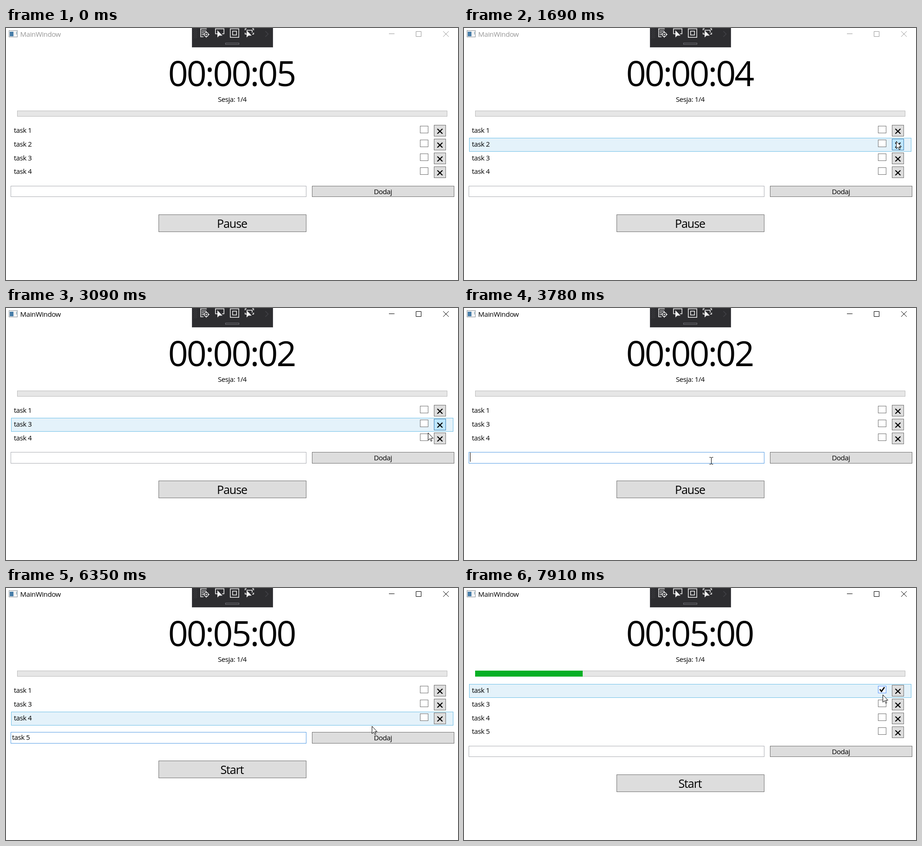
An HTML page that plays this animation: 975x546 px, repeating every 7.99 s.

```html
<!DOCTYPE html>
<html lang="pl">
<head>
<meta charset="utf-8">
<title>Task timer</title>
<style>
  html, body { margin: 0; width: 100%; height: 100%; overflow: hidden; background: #fff; }
  svg { display: block; width: 975px; height: 546px; }
  text { font: 15px "Open Sans", "Noto Sans", sans-serif; letter-spacing: -.03em; white-space: pre; }
  .mid { text-anchor: middle; }
  #timer { font-size: 75px; letter-spacing: -.039em; }
  #action { font-size: 25px; letter-spacing: -.042em; }
  .line { fill: none; stroke: #000; }
  .frame { color: #000; }
  .frame.idle { color: #999; }
  .frame text { fill: currentColor; letter-spacing: -.025em; }
  .frame .line { stroke: currentColor; }
  .btn { fill: #ddd; stroke: #707070; }
  .btn.hot { fill: #bee6fd; stroke: #3c7fb1; }
  .btn.down { fill: #c4e5f6; stroke: #2c628b; }
  .box { fill: #fff; stroke: #707070; }
  .box.hot { fill: #f3f9ff; stroke: #5593ff; }
  .row { fill: none; }
  .row.hot { fill: #e4f2fa; stroke: #70c0e7; }
  #field { fill: #fff; stroke: #abadb3; }
  #field.hot { stroke: #7eb4ea; }
  #field.focus { stroke: #569de5; }
  .tools { fill: none; stroke: #f1f1f1; stroke-width: 1.5; }
  .tools .solid { fill: #f1f1f1; stroke: none; }
  .tools .dim { stroke: #57575c; stroke-width: 1; }
</style>
</head>
<body>
<svg viewBox="0 0 975 546">
  <g>
    <rect x="6.5" y="5.5" width="18" height="14" fill="#f7f7f7" stroke="#8b9299"/>
    <rect x="8" y="8" width="8" height="10" fill="#477ca8"/>
    <path d="M17.5 8V18" stroke="#d5dbe0"/>
    <path d="M22.5 8V14" stroke="#5f91a9"/>
  </g>
  <g id="frame" class="frame">
    <text x="30.5" y="19">MainWindow</text>
    <path class="line" d="M826 12.5H838M884.5 7.5H895.5V18.5H884.5Z"/>
    <path class="line" d="M943 7L955 19M955 7L943 19"/>
  </g>

  <g class="tools">
    <rect x="401.5" y="-1" width="174" height="42.5" fill="#2d2d30" stroke="#46464b" stroke-width="1"/>
    <path class="dim" d="M405.5 1V22M409.5 1V22" stroke-dasharray="1 3"/>
    <path class="dim" d="M407.5 3V22M411.5 3V22" stroke-dasharray="1 3"/>
    <path d="M419 2H433M420 1V19H426M422 6.5H432M422 10.5H427M422 14.5H425"/>
    <circle cx="432" cy="14" r="4.5"/>
    <circle class="solid" cx="432" cy="14" r="1.6"/>
    <path d="M432 7V11M432 17V21M425 14H429M435 14H439"/>
    <path d="M456 12.5H451.8V1.8H470.2V12.5H466"/>
    <path class="solid" d="M456 5V20.5L460 16.5H467Z"/>
    <path d="M483.8 1.8H502.2V20.2H483.8ZM488.8 6.8H497.2V15.2H488.8Z"/>
    <path d="M515.8 5V1.8H519M531 1.8H534.2V5M515.8 10V13.2H519M534.2 10V13.2H531M519 4.8H531V10"/>
    <path class="solid" d="M519 5V20.5L523 16.5H530Z"/>
    <path class="dim" d="M559.5 7L565.5 13L559.5 19"/>
    <rect x="473.5" y="32.5" width="29" height="3" stroke="#707076" stroke-width="1"/>
  </g>

  <text id="timer" class="mid" x="486.6" y="126"></text>
  <text class="mid" x="488" y="160">Sesja: 1/4</text>
  <rect x="24.5" y="179.5" width="927" height="12" fill="#e6e6e6" stroke="#bcbcbc"/>
  <rect id="progress" x="24" y="179" width="232" height="13" fill="#06b025"/>

  <g id="list"></g>

  <g id="lower">
    <rect id="field" x="10.5" y="342.5" width="637"/>
    <text id="typed" x="13" y="359"></text>
    <path id="caret" class="line" d="M.5 343V363"/>
    <rect id="add" class="btn" x="660.5" y="342.5" width="306"/>
    <text class="mid" x="813" y="360">Dodaj</text>
    <rect class="btn" x="329.5" y="404.5" width="318" height="37"/>
    <text id="action" class="mid" x="487.5" y="433"></text>
  </g>

  <path id="arrow" fill="#fff" stroke="#000" d="M.5 .5V16.5L4.2 13.1L6.7 18.7L9 17.7L6.6 12.2H11.5Z"/>
  <path id="ibeam" class="line" d="M-3.5 -7.5H-1L.5 -6.5L2 -7.5H4.5M.5 -6.5V6.5M-3.5 7.5H-1L.5 6.5L2 7.5H4.5"/>
</svg>
<script>
const LOOP = 7990, STEP = 77.6, LEAD = 28;

// moments of the story, counted in screen updates
const ENTER = 5, PRESS = 31, REMOVE = 33, FOCUS = 49, TYPE = 59, TYPED = 72,
      BREAK = 63, RETURN = 78, BLUR = 88, ADD = 89, CHECK = 100;

const $ = id => document.getElementById(id);
const show = (el, on) => el.setAttribute('visibility', on ? 'visible' : 'hidden');
const move = (el, x, y) => el.setAttribute('transform', `translate(${x} ${y})`);
const flag = (el, name, on) => el.classList.toggle(name, on);

// pointer strokes in order; bend bows a stroke up or down
const strokes = [
  { from: 8, to: 22, x: 932, y: 245 },
  { from: 22, to: 29, x: 944, y: 252 },
  { from: 38, to: 40, x: 910, y: 270 },
  { from: 40, to: 48, x: 533, y: 331, bend: 25 },
  { from: 52, to: 54, x: 533, y: 326 },
  { from: 77, to: 82, x: 789, y: 299, bend: -90 },
  { from: 82, to: 87, x: 820, y: 325 },
  { from: 87, to: 89, x: 940, y: 293 },
  { from: 89, to: 99, x: 903, y: 223 },
  { from: 101, to: 102, x: 903, y: 231 }
];

function pointer(n) {
  let x = 900, y = 536;
  for (const s of strokes) {
    if (n <= s.from) break;
    const p = Math.min(1, (n - s.from) / (s.to - s.from));
    const e = p * p * (3 - 2 * p);
    x += (s.x - x) * e;
    y += (s.y - y) * e;
    if (p < 1) y += (s.bend || 0) * Math.sin(Math.PI * e);
  }
  return [Math.round(x), Math.round(y)];
}

$('list').innerHTML = [0, 1, 2, 3].map(i => `
  <g transform="translate(0 ${208 + i * 30})">
    <rect class="row" x="11.5" y=".5" width="953" height="29"/>
    <text x="17" y="${i === 3 ? 18 : 19}"></text>
    <rect class="box" x="893.5" y="4.5" width="17" height="15"/>
    <rect class="btn" x="923.5" y="2.5" width="25" height="24"/>
    <path class="line" stroke-width="2.2" d="M930.5 10.5L941.5 21M941.5 10.5L930.5 21"/>
  </g>`).join('') +
  '<path id="tick" class="line" stroke-width="2.6" d="M897 219.5L900.5 224L907 215"/>';

const rows = [...$('list').querySelectorAll('g')].map(g => ({
  g,
  back: g.querySelector('.row'),
  label: g.querySelector('text'),
  box: g.querySelector('.box'),
  btn: g.querySelector('.btn')
}));

function draw(n) {
  const tasks = [1, 2, 3, 4, 5].filter(k => k === 2 ? n < REMOVE : k < 5 || n >= ADD);
  const short = tasks.length === 3;
  const lift = short ? -30 : 0;
  const visible = n >= ENTER && (n < TYPE || n >= RETURN);
  const [x, y] = pointer(n);
  const [hx, hy] = pointer(n - 1);   // hover trails the pointer by one update
  const over = (l, t, r, b) => visible && hx >= l && hx < r && hy >= t && hy < b;

  flag($('frame'), 'idle', n < PRESS);
  const running = n < BREAK;
  $('timer').textContent = running ? `00:00:0${5 - Math.floor((n + 2) / 13)}` : '00:05:00';
  $('action').textContent = running ? 'Pause' : 'Start';
  show($('progress'), n >= CHECK);
  show($('tick'), n >= CHECK);

  rows.forEach((row, i) => {
    const top = 208 + i * 30;
    show(row.g, i < tasks.length);
    row.label.textContent = `task ${tasks[i]}`;
    flag(row.back, 'hot', over(11, top, 965, top + 30));
    flag(row.box, 'hot', over(893, top + 4, 911, top + 20));
    const hot = over(923, top + 2, 949, top + 27);
    flag(row.btn, 'hot', hot);
    flag(row.btn, 'down', hot && n >= PRESS && n < REMOVE);
  });

  const focused = n >= FOCUS && n < BLUR;
  move($('lower'), 0, lift);
  for (const id of ['field', 'add']) $(id).setAttribute('height', short ? 24 : 23);
  flag($('field'), 'hot', over(10, 342 + lift, 648, 366 + lift));
  flag($('field'), 'focus', focused);
  flag($('add'), 'hot', over(660, 342 + lift, 967, 366 + lift));

  // one key every three updates
  const count = n >= TYPE && n < ADD ? Math.floor((n - 54) / 3) : 0;
  $('typed').textContent = 'task 5'.slice(0, count);
  const width = count ? $('typed').getComputedTextLength() : 0;
  const rest = n < TYPE ? n - FOCUS : Math.max(0, n - TYPED);
  move($('caret'), Math.floor(13 + width), 0);
  show($('caret'), focused && rest % 14 < 7);

  const beam = n >= FOCUS && n < TYPE;
  show($('arrow'), visible && !beam);
  show($('ibeam'), beam);
  move($('arrow'), x, y);
  move($('ibeam'), x, y);
}

let last = -1;
const start = performance.now();
function loop(now) {
  const t = Math.max(0, now - start) % LOOP;
  const n = Math.floor((t + LEAD) / STEP);
  if (n !== last) draw(last = n);
  requestAnimationFrame(loop);
}
loop(start);
</script>
</body>
</html>
```
